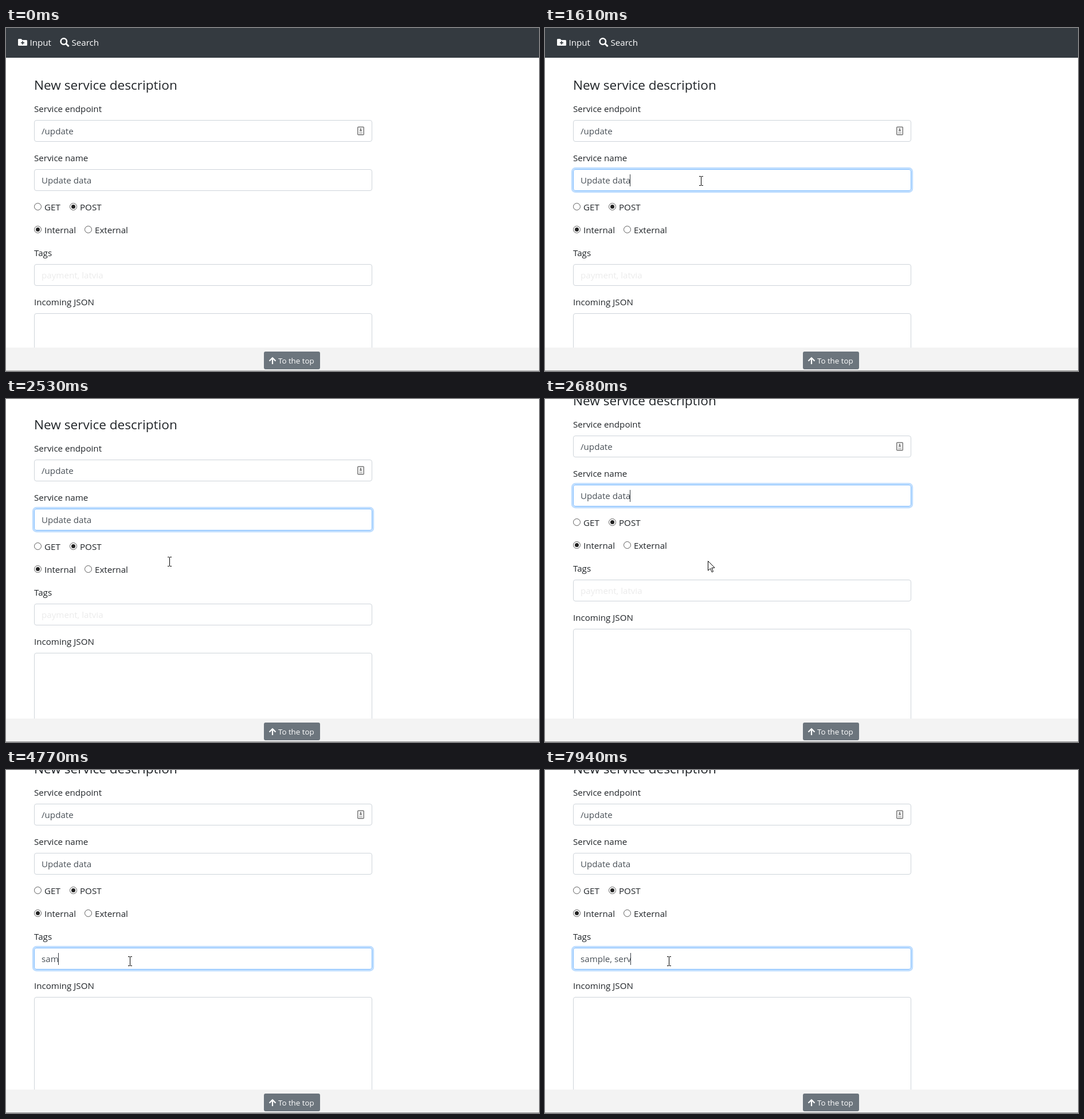
Recreate the animation shown at these times as an HTML page with a canvas. Size 930 by 600 pixels, loop 8000 ms.

```html
<!DOCTYPE html>
<html lang="en">
<head>
<meta charset="utf-8">
<title>New service description</title>
<style>
  html, body { margin: 0; width: 100%; height: 100%; overflow: hidden; background: #fff; }
  canvas { display: block; }
</style>
</head>
<body>
<canvas id="stage" width="930" height="600"></canvas>
<script>
const ctx = document.getElementById('stage').getContext('2d');
const LOOP = 8000;
const FAMILY = '"Open Sans", "Noto Sans", sans-serif';
const INK = '#212529', FIELD_INK = '#495057', NAV = '#343a40';

const fields = {
  endpoint: { y: 161, h: 38 },
  name: { y: 247, h: 38 },
  tags: { y: 413, h: 38 },
  json: { y: 499, h: 200 }
};
const FIELD_X = 49, FIELD_W = 590;

// [time, value], each value held until the next one
const scrollSteps = [[0, 0], [2370, 12], [2450, 36], [2530, 55], [2610, 67], [2680, 97], [2760, 102]];
const caretSteps = [[0, 0], [1490, 1], [2060, 0], [2610, 1], [3750, 0], [4230, 1],
  [5940, 0], [6430, 1], [6930, 0], [7160, 1]];
const TAGS = 'sample, serv';
const keyTimes = [4230, 4460, 4690, 4850, 5010, 5170, 5300, 5440, 7160, 7400, 7650, 7860];
const NAME_FOCUS = 1490, TAGS_FOCUS = 3140;

// [time, x, y], eased between neighbours
const pointerPath = [[560, 400, 604], [1400, 272, 267], [1700, 272, 267],
  [2370, 285, 284], [2760, 285, 284], [3130, 216, 334]];

const clamp = v => Math.max(0, Math.min(1, v));
const ease = p => p * p * (3 - 2 * p);
const lerp = (a, b, p) => a + (b - a) * p;
const held = (steps, t) => steps.filter(s => s[0] <= t).pop()[1];

function pointerAt(t) {
  const next = pointerPath.findIndex(p => p[0] > t);
  if (next === 0) return null;
  if (next < 0) return pointerPath[pointerPath.length - 1].slice(1);
  const [ta, xa, ya] = pointerPath[next - 1];
  const [tb, xb, yb] = pointerPath[next];
  const p = ease((t - ta) / (tb - ta));
  return [Math.round(lerp(xa, xb, p)), Math.round(lerp(ya, yb, p))];
}

function rect(x, y, w, h, color) {
  ctx.fillStyle = color;
  ctx.fillRect(x, y, w, h);
}

function round(x, y, w, h, r) {
  ctx.beginPath();
  ctx.roundRect(x, y, w, h, r);
}

function poly(points, color) {
  ctx.beginPath();
  points.forEach(([x, y]) => ctx.lineTo(x, y));
  ctx.closePath();
  ctx.fillStyle = color;
  ctx.fill();
}

function line(points, color, width) {
  ctx.beginPath();
  points.forEach(([x, y], i) => i ? ctx.lineTo(x, y) : ctx.moveTo(x, y));
  ctx.strokeStyle = color;
  ctx.lineWidth = width;
  ctx.stroke();
}

function text(str, x, y, color = INK, size = 15.15) {
  ctx.font = `${size}px ${FAMILY}`;
  ctx.fillStyle = color;
  ctx.fillText(str, x, y);
}

function field({ y, h }, focus = 0) {
  if (focus > 0) {
    const s = 3.2 * focus;
    round(FIELD_X - s, y - s, FIELD_W + 2 * s, h + 2 * s, 4 + s);
    ctx.fillStyle = `rgba(0,123,255,${0.25 * focus})`;
    ctx.fill();
  }
  round(FIELD_X, y, FIELD_W, h, 4);
  ctx.fillStyle = '#fff';
  ctx.fill();
  round(FIELD_X + 0.5, y + 0.5, FIELD_W - 1, h - 1, 3.5);
  ctx.lineWidth = 1;
  ctx.strokeStyle = `rgb(${lerp(206, 128, focus)},${lerp(212, 189, focus)},${lerp(218, 255, focus)})`;
  ctx.stroke();
}

function caret(str, y) {
  ctx.font = `15.15px ${FAMILY}`;
  const w = str ? ctx.measureText(str).width - 1 : 0;
  rect(Math.round(62 + w), y + 9, 1, 21, '#343a40');
}

function radio(x, y, label, on) {
  ctx.beginPath();
  ctx.arc(x, y, 6, 0, 7);
  ctx.strokeStyle = '#5c5c5c';
  ctx.lineWidth = 1;
  ctx.stroke();
  if (on) {
    ctx.beginPath();
    ctx.arc(x, y, 3.5, 0, 7);
    ctx.fillStyle = '#222';
    ctx.fill();
  }
  text(label, x + 11.5, y + 6.5);
}

function contactIcon(x, y) {
  round(x + 0.75, y + 0.75, 10.5, 13.5, 1);
  ctx.strokeStyle = '#777';
  ctx.lineWidth = 1.5;
  ctx.stroke();
  rect(x + 5, y + 3, 2, 3, '#777');
  rect(x + 4, y + 6, 4, 2, '#777');
  rect(x + 3, y + 10, 6, 1, '#999');
  rect(x + 3, y + 12, 6, 1, '#bbb');
}

function navBar() {
  rect(0, 0, 930, 52, NAV);
  round(21, 21, 16, 10, 1.5);
  ctx.fillStyle = '#fff';
  ctx.fill();
  poly([[21, 23], [21, 20], [22, 19], [26.5, 19], [28.5, 21], [30, 23]], '#fff');
  rect(26, 25, 6, 1.6, NAV);
  rect(28.2, 22.8, 1.6, 6, NAV);
  text('Input', 41.5, 31, '#fff');

  ctx.beginPath();
  ctx.arc(100.8, 23.5, 5.2, 0, 7);
  ctx.strokeStyle = '#fff';
  ctx.lineWidth = 2.6;
  ctx.stroke();
  line([[104.5, 27.2], [109.6, 32.2]], '#fff', 3);
  text('Search', 114.5, 31, '#fff');
}

function footer(t) {
  rect(0, 559, 930, 41, '#f3f3f3');
  rect(0, 599, 930, 1, t < 500 ? '#a8a8a8' : '#8c8c8c');
  round(450, 566, 98, 31, 3);
  ctx.fillStyle = '#6c757d';
  ctx.fill();
  line([[459.5, 582.5], [465, 577], [470.5, 582.5]], '#fff', 2.2);
  line([[465, 577], [465, 588]], '#fff', 2.2);
  text('To the top', 475, 587, '#fff', 13.3);
}

function page(t) {
  const nameFocus = ease(clamp((t - NAME_FOCUS) / 110)) * (1 - ease(clamp((t - TAGS_FOCUS) / 150)));
  const tagsFocus = ease(clamp((t - TAGS_FOCUS) / 150));
  const caretOn = held(caretSteps, t);
  const typed = TAGS.slice(0, keyTimes.filter(k => k <= t).length);

  navBar();
  text('New service description', 49, 108, INK, 22.6);

  text('Service endpoint', 49, 147);
  field(fields.endpoint);
  text('/update', 62, 186, FIELD_INK);
  contactIcon(613, 172.5);

  text('Service name', 49, 233);
  field(fields.name, nameFocus);
  text('Update data', 62, 272, FIELD_INK);

  radio(55.5, 312.5, 'GET', false);
  radio(117.5, 312.5, 'POST', true);
  radio(55.5, 352.5, 'Internal', true);
  radio(143.5, 352.5, 'External', false);

  text('Tags', 49, 399);
  field(fields.tags, tagsFocus);
  if (typed) text(typed, 62, 438, FIELD_INK);
  else text('payment, latvia', 62, 438, '#ebebeb');

  text('Incoming JSON', 49, 485);
  field(fields.json);

  if (caretOn) {
    if (t < TAGS_FOCUS) caret('Update data', fields.name.y);
    else caret(typed, fields.tags.y);
  }
}

function overField(x, y, scroll) {
  return y < 559 && x >= FIELD_X && x < FIELD_X + FIELD_W &&
    Object.values(fields).some(f => y + scroll >= f.y && y + scroll < f.y + f.h);
}

function beam(x, y) {
  rect(x, y - 7, 1, 15, '#000');
  for (const edge of [y - 8, y + 8]) {
    rect(x - 3, edge, 3, 1, '#000');
    rect(x + 1, edge, 3, 1, '#000');
  }
}

function arrow(x, y) {
  const shape = [[0, 0], [0, 16.5], [4, 13], [6.7, 19.3], [9, 18.3], [6.4, 12], [11.5, 11.6]]
    .map(([dx, dy]) => [x + dx + 0.5, y + dy + 0.5]);
  poly(shape, '#fff');
  line([...shape, shape[0]], '#000', 1);
}

function draw(t) {
  const scroll = held(scrollSteps, t);
  rect(0, 0, 930, 600, '#fff');
  ctx.save();
  ctx.translate(0, -scroll);
  page(t);
  ctx.restore();
  footer(t);

  const spot = pointerAt(t);
  if (!spot) return;
  const [x, y] = spot;
  // the text pointer lingers until the first move after scrolling
  const lingering = t > 1500 && t < 2650;
  if (lingering || overField(x, y, scroll)) beam(x, y);
  else arrow(x - 1, y - 1);
}

const start = performance.now();
function tick() {
  draw((performance.now() - start) % LOOP);
  requestAnimationFrame(tick);
}
tick();
</script>
</body>
</html>
```
